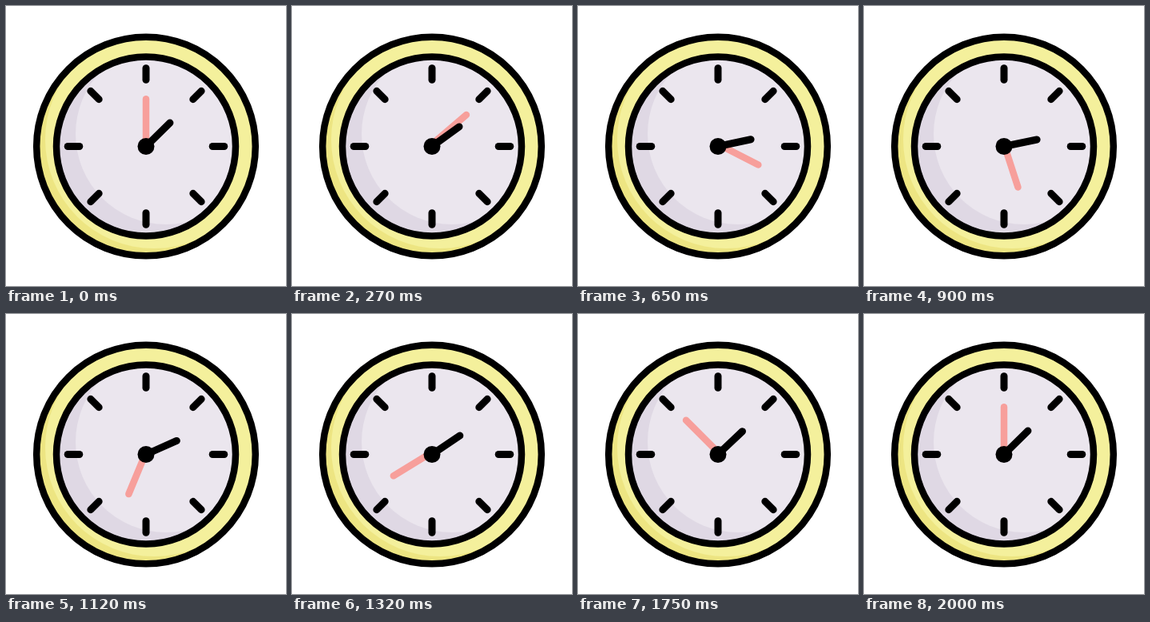
An HTML page for the animation above (2.02 s loop, 350 px wide and 350 px high).

```html
<!DOCTYPE html>
<html lang="en">
<head>
<meta charset="utf-8">
<title>Clock</title>
<style>
  html, body { margin: 0; width: 100%; height: 100%; overflow: hidden; background: #fff; }
  svg { display: block; width: 100vw; height: 100vh; }
  line { stroke: #000; stroke-width: 9; stroke-linecap: round; }
</style>
</head>
<body>
<svg viewBox="0 0 350 350">
  <defs>
    <clipPath id="rim"><circle cx="175" cy="175.5" r="135"/></clipPath>
    <clipPath id="dial"><circle cx="175" cy="175.5" r="110"/></clipPath>
  </defs>
  <circle cx="175" cy="175.5" r="135" fill="#ede582"/>
  <circle cx="185" cy="167" r="136" fill="#f4f09c" clip-path="url(#rim)"/>
  <circle cx="175" cy="175.5" r="110" fill="#dfd8e4"/>
  <circle cx="200" cy="160" r="113" fill="#ebe6ee" clip-path="url(#dial)"/>
  <g fill="none" stroke="#000" stroke-width="8.5">
    <circle cx="175" cy="175.5" r="136.8"/>
    <circle cx="175" cy="175.5" r="112"/>
  </g>
  <g id="ticks"></g>
  <line id="minute" x1="175" y1="172.8" x2="175" y2="116.3" style="stroke:#f79f9b;stroke-width:8.5"/>
  <line id="hour" x1="175" y1="175.5" x2="175" y2="133.5"/>
  <circle cx="175" cy="175.5" r="10.5"/>
</svg>
<script>
const LOOP = 2020, FRAMES = 80, PEAK = 0.4;
const byId = id => document.getElementById(id);

for (let a = 0; a < 360; a += 45) {
  byId('ticks').innerHTML +=
    `<line x1="175" y1="77.7" x2="175" y2="92.3" transform="rotate(${a} 175 175.5)"/>`;
}

// Cubic Bezier easing, solved for x by bisection
function ease(x, x1, y1, x2, y2) {
  const at = (s, a, b) => 3 * a * s * (1 - s) ** 2 + 3 * b * s * s * (1 - s) + s ** 3;
  let lo = 0, hi = 1;
  for (let i = 0; i < 20; i++) {
    const mid = (lo + hi) / 2;
    if (at(mid, x1, x2) < x) lo = mid; else hi = mid;
  }
  return at(lo, y1, y2);
}

// The hour hand swings forward, then settles back
function swing(p) {
  return p < PEAK
    ? ease(p / PEAK, 0.42, 0, 0.58, 1)
    : 1 - ease((p - PEAK) / (1 - PEAK), 0.25, 0.08, 0.3, 1);
}

function turn(id, angle, pivotY) {
  byId(id).setAttribute('transform', `rotate(${angle} 175 ${pivotY})`);
}

function draw() {
  const t = performance.now() % LOOP;
  // 40 steps a second, each starting on a whole 10 ms
  const step = Math.floor((Math.floor(t / 10) * 10 + 5) / 25);
  const p = Math.min(step / FRAMES, 1);
  turn('minute', 360 * p, 172.8);
  turn('hour', 45.5 + 35 * swing(p), 175.5);
  requestAnimationFrame(draw);
}
draw();
</script>
</body>
</html>
```
